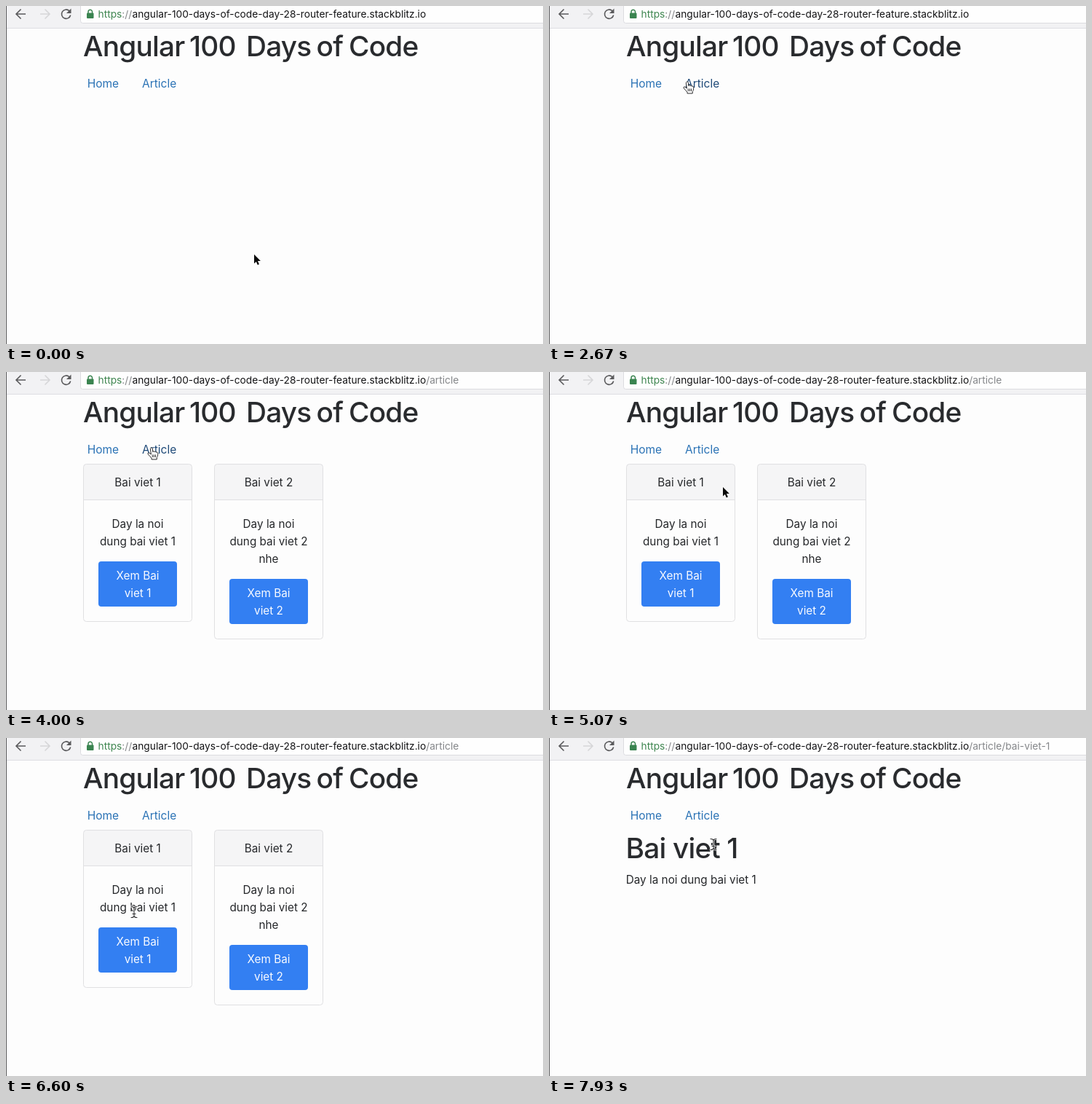
An HTML page for the animation above (8000 ms loop, 738 px wide and 464 px high).

```html
<!DOCTYPE html>
<html lang="en">
<head>
<meta charset="utf-8">
<title>Router demo</title>
<style>
  html, body { margin: 0; width: 100%; height: 100%; overflow: hidden; background: #fdfdfd; }
  svg { display: block; width: 738px; height: 464px; }
  text {
    font: 15.3px Inter, "Open Sans", sans-serif;
    font-optical-sizing: none;
    fill: #25272a;
    white-space: pre;
  }
  .url { font-size: 13.76px; fill: #141416; }
  .url .scheme { fill: #3f8650; }
  .url .sep, .path { fill: #85878a; }
  .h1 { font-size: 38.8px; font-weight: 500; letter-spacing: -.8px; fill: #292b2e; }
  .link { font-size: 15.5px; fill: #2a72b5; }
  .link.hover { fill: #1f4a78; }
  .mid { text-anchor: middle; }
  .card { fill: none; stroke: #e0e0e2; }
  .head { fill: #f5f5f6; }
  .btn { fill: #337ff2; }
  .on-btn { fill: #f8faff; }
  .icon { fill: none; stroke: #5a5a5c; stroke-width: 1.6; }
  .icon.off { stroke: #d6d6d8; }
</style>
</head>
<body>
<svg viewBox="0 0 738 464">
  <rect width="738" height="464" fill="#fdfdfd"/>

  <g id="toolbar">
    <rect width="738" height="30" fill="#f2f2f4"/>
    <path d="M0 30.5H738" stroke="#dedee3"/>
    <rect x="102.5" y="-6.5" width="650" height="30" rx="3" fill="#fefefe" stroke="#dcdce0"/>
    <path class="icon" d="M27 11H14.5M20.5 4.5L14 11L20.5 17.5"/>
    <path class="icon off" d="M47 11H59.5M53.5 4.5L60 11L53.5 17.5"/>
    <path class="icon" d="M87 6.7A6.2 6.2 0 1 0 88.7 12.5"/>
    <path d="M89.5 3.5V10H83Z" fill="#5a5a5c"/>
    <rect x="111" y="9.5" width="9.5" height="7.5" rx="1" fill="#3a8450"/>
    <path d="M113 10V8a2.75 2.75 0 0 1 5.5 0V10" fill="none" stroke="#3a8450" stroke-width="1.5"/>
    <text class="url" x="126.5" y="16"><tspan class="scheme">https</tspan><tspan class="sep">://</tspan></text>
    <text class="url" x="173.5" y="16">angular-100-days-of-code-day-28-router-feature.stackblitz.io<tspan class="path" id="path"></tspan></text>
  </g>

  <text class="h1" y="69"><tspan x="106">Angular</tspan><tspan x="252">100</tspan><tspan x="330">Days</tspan><tspan x="426.5">of</tspan><tspan x="471">Code</tspan></text>
  <text class="link" x="111.7" y="112">Home</text>
  <text class="link" id="article" x="187" y="112">Article</text>

  <g id="list"></g>
  <g id="detail">
    <text class="h1" x="105.5" y="165">Bai viet 1</text>
    <text x="105.7" y="200">Day la noi dung bai viet 1</text>
  </g>
  <path d="M.5 0V464" stroke="#5e5e60"/>

  <g id="cursor" stroke-linejoin="round" stroke-linecap="round">
    <path id="arrow" d="M0 0V12.5L2.9 9.9L4.8 14.6L6.9 13.6L5 9.1H8.9Z"
      fill="#0a0a0a" stroke="#fff" paint-order="stroke"/>
    <g id="hand" stroke="#1c1c1e" transform="scale(.94)">
      <path fill="#fff" d="M-1.7 1.3C-1.7-.5 1.3-.5 1.4 1.3L1.9 6
        C2.3 4.6 4.3 4.8 4.5 6.2C5.2 5 7 5.4 7 6.8C8 6 9.3 6.6 9.3 8
        C9.3 11.5 8.7 13 7.7 14.5V17H0V15.2C-1.5 13.5-3.3 11.3-5 9.5
        C-6.2 8-4.4 6.7-3 7.7L-1 9.3Z"/>
      <path fill="none" d="M1.3 10.5V13.5M3.6 10.5V13.5M5.9 10.5V13.5"/>
    </g>
    <g id="beam" fill="none">
      <defs>
        <path id="stem" d="M-4-7.5Q-.5-7.5 0-5.5Q.5-7.5 4-7.5M0-5.5V5.5M-4 7.5Q-.5 7.5 0 5.5Q.5 7.5 4 7.5M-2 2.5H2"/>
      </defs>
      <use href="#stem" stroke="#fff" stroke-width="2.6"/>
      <use href="#stem" stroke="#303032" stroke-width="1.1"/>
    </g>
  </g>
</svg>
<script>
const LOOP = 8000, OPEN_LIST = 3700, OPEN_DETAIL = 7350;
const $ = id => document.getElementById(id);

// Time, x and y of the pointer's hot spot
const track = [
  [0, 341, 341], [120, 341, 341], [880, 188, 109], [1270, 186, 107],
  [1750, 186, 107], [1950, 190, 104], [2900, 190, 104], [3450, 200, 104],
  [4350, 200, 104], [4950, 239, 158], [5650, 239, 158], [6500, 176, 239],
  [6680, 176, 239], [7080, 182, 286], [7400, 182, 286], [7920, 226, 146],
  [LOOP, 226, 146]
];

// Hover areas: left, top, right, bottom
const article = [187, 97, 234, 118];
const buttons = [[127, 260, 235, 322], [307, 284, 415, 346]];
const copy = {
  home: [],
  list: [[149, 142, 213, 162], [129, 199, 233, 245]],
  detail: [[107, 130, 260, 174], [106, 184, 285, 206]]
};

function card(x, n, lines) {
  const cx = x + 74.5, top = 260 + (lines.length - 2) * 24;
  const label = (s, y, cls = "") => `<text class="mid ${cls}" x="${cx}" y="${y}">${s}</text>`;
  return `<path class="head" d="M${x} 175.5V130.5q0-4 4-4h141q4 0 4 4v45Z"/>
    <path class="card" d="M${x} 175.5h149"/>
    <rect class="card" x="${x}" y="126.5" width="149" height="${top - 44}" rx="4"/>
    <rect class="btn" x="${x + 20.5}" y="${top}" width="108" height="62" rx="4"/>` +
    label("Bai viet " + n, 157) +
    lines.map((s, i) => label(s, 214 + 24 * i)).join("") +
    label("Xem Bai", top + 25, "on-btn") + label("viet " + n, top + 49, "on-btn");
}

$("list").innerHTML =
  card(106.5, 1, ["Day la noi", "dung bai viet 1"]) +
  card(286.5, 2, ["Day la noi", "dung bai viet 2", "nhe"]);

const inside = ([l, t, r, b], x, y) => x >= l && x <= r && y >= t && y <= b;
const show = (id, on) => { $(id).style.display = on ? "" : "none"; };

function pointerAt(t) {
  const i = track.findIndex(k => k[0] > t);
  const [t0, x0, y0] = track[i - 1], [t1, x1, y1] = track[i];
  const p = (t - t0) / (t1 - t0), e = p * p * (3 - 2 * p);
  return [x0 + (x1 - x0) * e, y0 + (y1 - y0) * e];
}

function draw(t) {
  const page = t < OPEN_LIST ? "home" : t < OPEN_DETAIL ? "list" : "detail";
  const [x, y] = pointerAt(t);
  const hit = area => inside(area, x, y);
  const onArticle = hit(article);
  const shape = onArticle || (page === "list" && buttons.some(hit)) ? "hand"
    : copy[page].some(hit) ? "beam" : "arrow";

  show("list", page === "list");
  show("detail", page === "detail");
  $("path").textContent = { home: "", list: "/article", detail: "/article/bai-viet-1" }[page];
  $("article").classList.toggle("hover", onArticle);
  for (const id of ["arrow", "hand", "beam"]) show(id, id === shape);
  $("cursor").setAttribute("transform", `translate(${x.toFixed(1)} ${y.toFixed(1)})`);
}

const start = performance.now();
function tick() {
  draw((performance.now() - start) % LOOP);
  requestAnimationFrame(tick);
}
tick();
</script>
</body>
</html>
```
